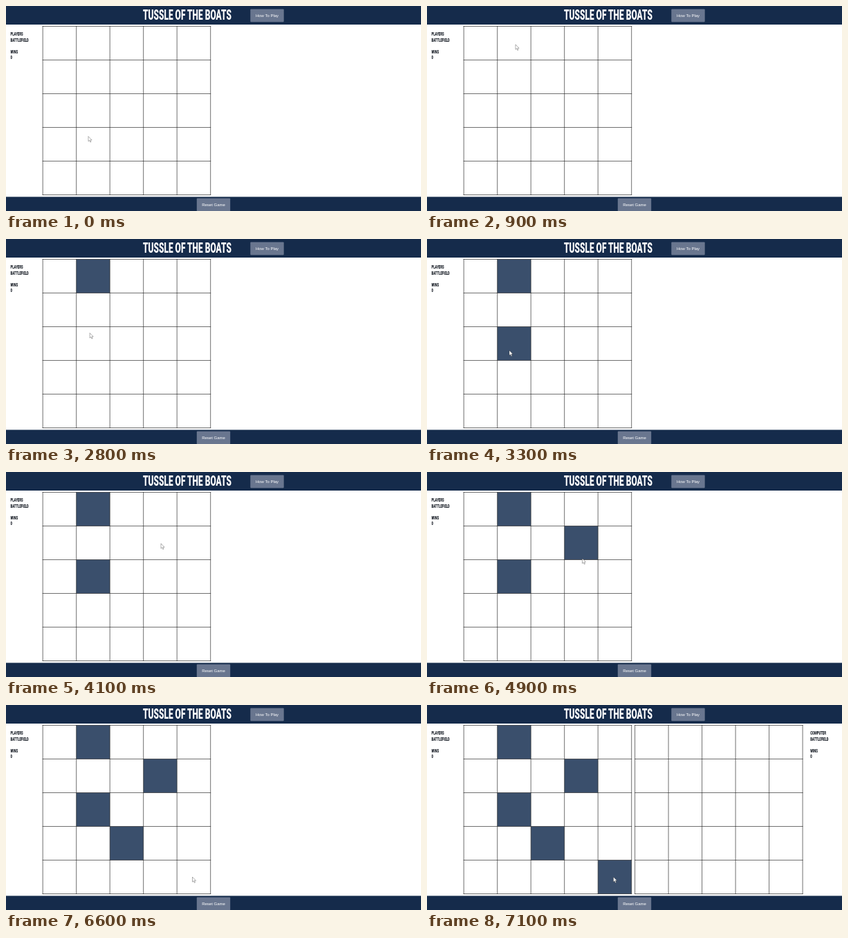
An HTML page that plays this animation: 600x298 px, repeating every 7400 ms.

```html
<!DOCTYPE html>
<html lang="en">
<head>
<meta charset="utf-8">
<title>Tussle of the Boats</title>
<style>
  html, body { margin: 0; height: 100%; overflow: hidden; background: #fff; }
  svg { display: block; width: 100vw; height: 100vh; }
  .display { font-family: Roboto, sans-serif; font-weight: 900; }
  .button { font: 6px "Liberation Sans", Arial, sans-serif; fill: #fff; text-anchor: middle; }
</style>
</head>
<body>
<svg id="stage" viewBox="0 0 600 298">
  <rect width="600" height="27" fill="#152b4b"/>
  <rect y="277.4" width="600" height="21" fill="#152b4b"/>
</svg>
<script>
const LOOP = 7400;
const STEP = 100;
const CONDENSE = 0.57;
const CELL = { w: 48.5, h: 49 };
const PLAYER_X = 53.2;
const COMPUTER_X = 300.6;
const GRID_Y = 29.5;

const stage = document.getElementById("stage");

function add(parent, tag, attrs, text = "") {
  const node = document.createElementNS("http://www.w3.org/2000/svg", tag);
  for (const key in attrs) node.setAttribute(key, attrs[key]);
  node.textContent = text;
  parent.appendChild(node);
  return node;
}

function displayText(parent, x, y, size, fill, text) {
  add(parent, "text", {
    class: "display", "font-size": size, fill,
    transform: `translate(${x} ${y}) scale(${CONDENSE} 1)`
  }, text);
}

function button(x, y, label) {
  add(stage, "rect", { x, y, width: 48.4, height: 18.8, rx: 1, fill: "#69768f" });
  add(stage, "text", { class: "button", x: x + 24.2, y: y + 11.2 }, label);
}

function grid(parent, left) {
  let d = "";
  for (let i = 0; i <= 5; i++) {
    d += `M${left + i * CELL.w} ${GRID_Y}v${5 * CELL.h}`;
    d += `M${left} ${GRID_Y + i * CELL.h}h${5 * CELL.w}`;
  }
  add(parent, "path", {
    d, fill: "none", stroke: "#222", "stroke-width": 0.65, "stroke-linecap": "square"
  });
}

function labels(parent, x, owner) {
  [owner, "BATTLEFIELD", "", "WINS", "0"].forEach((text, row) =>
    displayText(parent, x, 43.2 + row * 8.5, 7.4, "#10161f", text));
}

// Each shot: pointer leaves, arrives at (x, y), then clicks; bend bows the path sideways.
const origin = { x: 119, y: 189.5 };
const shots = [
  { leave: 0, arrive: 900, click: 1900, x: 128, y: 56, bend: 48 },
  { leave: 2500, arrive: 3000, click: 3300, x: 119, y: 162, bend: 0 },
  { leave: 3400, arrive: 4100, click: 4300, x: 224, y: 104, bend: 0 },
  { leave: 4800, arrive: 5300, click: 5600, x: 185.5, y: 205, bend: 14 },
  { leave: 5800, arrive: 6600, click: 7100, x: 269.5, y: 250, bend: 0 }
];

function ship({ x, y, click }) {
  const col = Math.floor((x - PLAYER_X) / CELL.w);
  const row = Math.floor((y - GRID_Y) / CELL.h);
  const node = add(stage, "rect", {
    x: PLAYER_X + col * CELL.w, y: GRID_Y + row * CELL.h,
    width: CELL.w, height: CELL.h, fill: "#3a4f6c"
  });
  return { node, at: click };
}

displayText(stage, 198, 20.4, 21, "#fff", "TUSSLE OF THE BOATS");
button(353.3, 4.4, "How To Play");
button(275.8, 279.4, "Reset Game");

const reveals = shots.map(ship);
grid(stage, PLAYER_X);
labels(stage, 6.5, "PLAYERS");

const computer = add(stage, "g", {});
grid(computer, COMPUTER_X);
labels(computer, 554.3, "COMPUTER");
reveals.push({ node: computer, at: shots.at(-1).click });

const cursor = add(stage, "path", {
  d: "M0 0V7.2L1.7 5.7L2.8 8.4L4 7.9L2.9 5.3H5.1Z",
  fill: "#fff", stroke: "#222", "stroke-opacity": 0.6,
  "stroke-width": 0.6, "stroke-linejoin": "round"
});

// Smoothstep with a quicker start
function ease(u) {
  const v = u ** 0.75;
  return v * v * (3 - 2 * v);
}

function pointerAt(t) {
  const i = shots.findLastIndex(shot => shot.leave <= t);
  const to = shots[i];
  const from = shots[i - 1] || origin;
  const k = ease(Math.min(1, (t - to.leave) / (to.arrive - to.leave)));
  return [
    from.x + (to.x - from.x) * k + to.bend * Math.sin(Math.PI * k),
    from.y + (to.y - from.y) * k
  ];
}

function render(time) {
  const t = Math.floor((time % LOOP) / STEP) * STEP;
  cursor.setAttribute("transform", `translate(${pointerAt(t)})`);
  for (const { node, at } of reveals) node.style.display = t >= at ? "" : "none";
}

const start = performance.now();
function tick() {
  render(performance.now() - start);
  requestAnimationFrame(tick);
}
tick();
</script>
</body>
</html>
```
